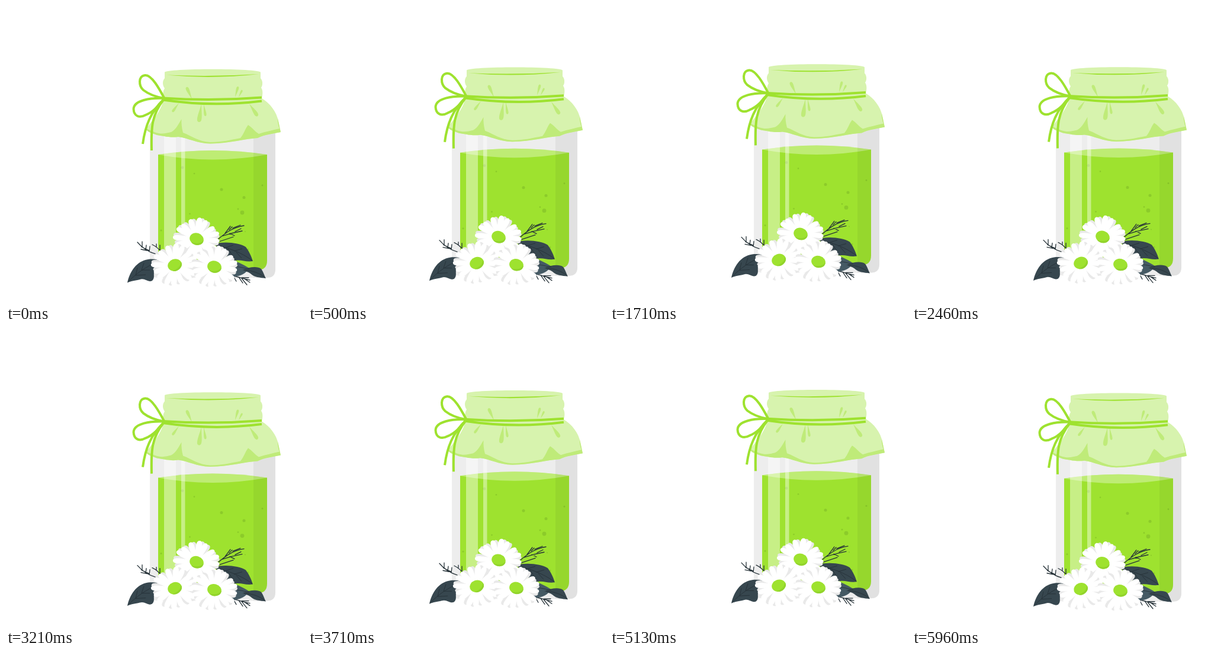
An HTML page that plays this animation: 500x500 px, repeating every 6 s.

```html
<!DOCTYPE html>
<html lang="en">
<head>
<meta charset="utf-8">
<title>Jar with daisies</title>
<style>
  html, body { margin: 0; width: 100%; height: 100%; overflow: hidden; background: #fff; }
  svg { display: block; width: 100%; height: 100%; }
  .line { fill: none; stroke-linecap: round; }
  .twig { fill: none; stroke: #263238; stroke-width: 1.3; stroke-linecap: round; }
  .vein { fill: none; stroke: #263238; stroke-width: .9; }
</style>
</head>
<body>
<svg viewBox="0 0 500 500">
<defs>
  <path id="petal" d="M0 0C7 -3.5 18 -5.2 30 -5.2C37 -5.2 40 -3 40 0C40 3.3 36 5 30 4.8C18 4.5 8 3 0 0Z"/>
</defs>
<g id="scene">
  <!-- glass -->
  <path fill="#ededed" d="M243 200H455V445Q455 459 441 459H257Q243 459 243 445Z"/>
  <!-- liquid -->
  <path fill="#9ee22f" d="M257 251Q349 237 441 251V430Q441 446 425 446H273Q257 446 257 430Z"/>
  <path fill="#fff" opacity=".33" d="M257 251Q349 237 441 251Q349 268 257 251Z"/>
  <g id="bubbles" fill="#8ccb2a"></g>
  <path fill="#fff" opacity=".42" d="M267 205H287V446H273Q270 446 267 445ZM296 205H302.500V446H296Z"/>
  <path opacity=".05" d="M418 205H455V445Q455 459 441 459H418Z"/>

  <!-- cloth cover -->
  <path fill="#d7f3ae" d="M268 112C270 105 428 105 430 112V122C434 126 434 134 431 138C434 142 434 149 432 156C446 164 457 179 460 194L464 213C450 216 437 217 425 223C405 224 378 232 345 232.500C322 232 308 223 291 221C276 223 264 219 255 218C248 215 240 214 236 208C246 195 262 178 266 158C264 151 265 144 268 139C264 134 264 126 268 122Z"/>
  <path fill="#bfeb79" d="M236 207C246 210 250 214 261 215.500C268 216 274 214 279 213C288 208 292 198 296.500 191C296 199 297 206 299 214C315 220 325 229 345 230C365 230 380 226 396 223C402 216 404 207 409 201C416 205 420 212 427 216C439 212 450 210 462 207C459 200 459 194 459 190L464 213C450 216 437 217 425 223C405 224 378 232 345 232.500C322 232 308 223 291 221C276 223 264 219 255 218C248 215 240 214 236 207Z"/>
  <path fill="#9ee22f" d="M271 116.500Q349 120 427 115Q349 124 271 116.500Z"/>
  <g id="folds" fill="#bfeb79"></g>

  <!-- string -->
  <g class="line" stroke="#9ee22f" stroke-width="4">
    <path stroke-linecap="butt" d="M265 155.500Q349 161 432 154.500M265 158.500Q349 171 432 160.500"/>
    <path d="M267 155C259 140 246 116 235 117C223 118 224 135 232 142C241 149 256 154 267 156"/>
    <path d="M267 156C244 155 216 159 215.500 174C216 186 225 190 236 184C249 179 259 167 267 157"/>
    <path stroke-linecap="butt" d="M267 157C244 179 235 203 231 233M267 157C246 184 245 204 246 244"/>
  </g>

  <!-- twigs -->
  <g class="twig">
    <path d="M357 395C370 384 382 374 402 371M370 384L379 372M377 378L382 373M383 375L396 370M364 389C376 385 388 382 399 380M378 384L386 388M387 381L397 376M360 398L384 390"/>
    <path d="M222 399C230 409 242 416 256 420M230 407L230 398M236 412L237 404M229 407L242 413M238 413L228 411M242 415L243 406M247 403C254 406 260 412 266 420M254 407L254 402M260 412L260 404"/>
    <path d="M384 456C394 458 404 462 412 463M393 458L400 468M398 460L407 471M398 459L410 459M385 458L389 465M403 461L412 467"/>
  </g>

  <!-- leaves -->
  <path fill="#37474f" d="M205 467.500C209 449 220 431 240 428C248 427 256 428 262 430L252 445C247 452 253 458 247 464C240 468 235 459 226 462C218 464 212 464 205 467.500Z"/>
  <path class="vein" d="M206 466C219 453 237 439 256 433M219 455L222 442M229 446L233 434M229 446L243 446M219 455L236 454"/>
  <path fill="#455a64" d="M372 427C388 430 400 436 411 443C405 452 394 458 383 457L366 446Z"/>
  <path fill="#37474f" d="M352 402C369 397 394 400 405 407C411 415 414 422 417 431C405 433 397 428 388 430C375 430 365 416 352 402Z"/>
  <path class="vein" d="M354 403C375 409 396 415 416 430M371 408L384 404M385 414L399 410M375 410L384 424M389 416L398 426"/>
  <path fill="#37474f" d="M399 446C411 441 424 439 431 444C435 449 436 455 439 460C429 459 419 458 413 452C409 449 404 448 399 446Z"/>
  <path class="vein" d="M385 440C400 441 405 444 411 444M402 446C417 447 428 451 438 459"/>
  <g id="flowers"></g>
</g>
</svg>
<script>
const $ = id => document.getElementById(id);

// x, y, radius
$('bubbles').innerHTML = [
  [298, 273, 2.4], [318, 283, 1.3], [364, 310, 2.5], [402, 323.5, 2.5], [392, 343, 1.4], [399, 349, 3.4],
  [433, 303, 1.4], [310.5, 351, 1.3], [262, 379, 1.5], [404, 381, 1], [409, 411, 1.3]
].map(([x, y, r]) => `<circle cx="${x}" cy="${y}" r="${r}"/>`).join('');

// tip, blunt end, width
$('folds').innerHTML = [
  [314, 157, 305, 137, 5], [387, 154, 392, 136, 4], [393, 154, 399, 142, 3], [292, 164, 281, 179, 4],
  [330, 166, 326, 196, 7], [334, 166, 337, 186, 4], [411, 165, 425, 186, 6]
].map(([x, y, u, v, w]) => {
  const len = Math.hypot(u - x, v - y), turn = Math.atan2(v - y, u - x) * 180 / Math.PI;
  return `<path transform="translate(${x} ${y}) rotate(${turn})"
    d="M0 0C${len / 2} ${-w / 3} ${len} ${-w} ${len} 0C${len} ${w} ${len / 2} ${w / 3} 0 0Z"/>`;
}).join('');

const PETALS = 16;

function flower(x, y, start, tilt) {
  const ring = (color, shift, size) => Array.from({ length: PETALS }, (_, i) => {
    const angle = start + shift + i * 360 / PETALS + 3 * Math.sin(i * 2.3);
    const scale = size * (0.97 + 0.04 * Math.sin(i * 1.7));
    return `<use href="#petal" fill="${color}" transform="rotate(${angle}) scale(${scale})"/>`;
  }).join('');
  return `<g transform="translate(${x} ${y})">
    <g transform="scale(1 .9)">${ring('#e9e9e9', 8, .99)}${ring('#fff', 0, 1)}</g>
    <g transform="rotate(${tilt})">
      <ellipse rx="12" ry="10" fill="#9ee22f"/>
      <path d="M11.800 -2A12 10 0 0 1 -7 8.200Q8 8 11.800 -2Z" fill="#92d42c"/>
    </g></g>`;
}

$('flowers').innerHTML =
  flower(322, 393.5, 6, 20) + flower(285, 437.5, 2, -20) + flower(352, 440.5, 10, 15);

// Linear rise and fall of 10px every 3s
function frame(now) {
  const phase = now % 3000 / 1500;
  $('scene').setAttribute('transform', `translate(0 ${-10 * (1 - Math.abs(1 - phase))})`);
  requestAnimationFrame(frame);
}
frame(performance.now());
</script>
</body>
</html>
```
